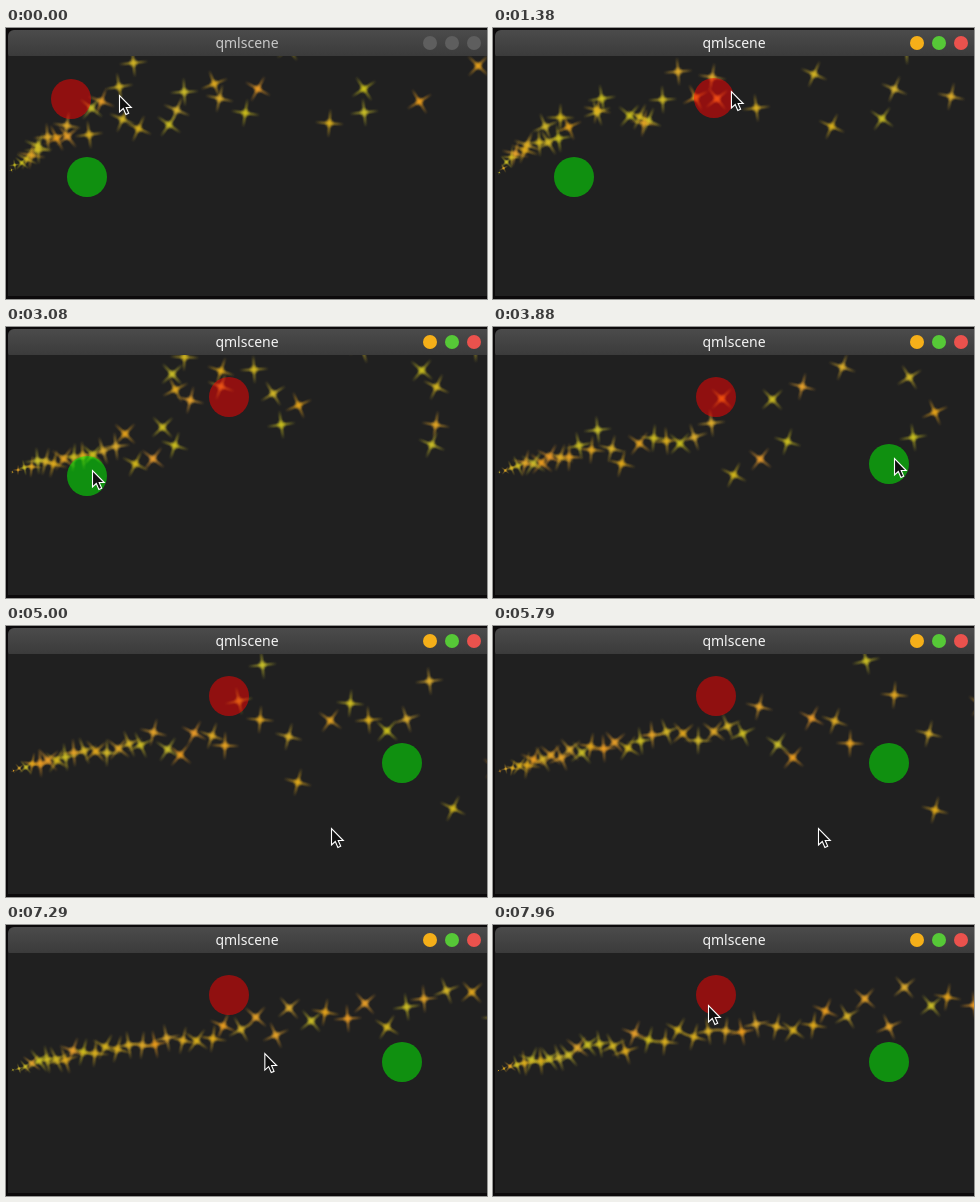
Animation, 481 px wide and 271 px high, one loop 8000 ms. Source, as an HTML page with a canvas:

```html
<!DOCTYPE html>
<html>
<head>
<meta charset="utf-8">
<title>qmlscene</title>
<style>
html, body { margin: 0; width: 100%; height: 100%; overflow: hidden; background: #0c0a0b; }
canvas { display: block; width: 100vw; height: 100vh; }
</style>
</head>
<body>
<canvas id="stage" width="481" height="271"></canvas>
<script>
const ctx = document.getElementById('stage').getContext('2d');
const LOOP = 8000, LIFE = 5000, EMIT_EVERY = 100, FOCUS_AT = 1000;
const SPEED = 55, PULL = 50;

const point = (x, y) => ({ x, y });
const add = (a, b) => point(a.x + b.x, a.y + b.y);
const mix = (a, b, u) => point(a.x + (b.x - a.x) * u, a.y + (b.y - a.y) * u);

// Eased progress from 0 to 1 between two times.
function ease(t, start, end) {
  const u = Math.min(1, Math.max(0, (t - start) / (end - start)));
  return u * u * (3 - 2 * u);
}

const emitter = point(2, 146.5);
const redDrag = t => ease(t, 1120, 1400);
const greenDrag = t => ease(t, 3430, 3830);
const redAt = t => mix(point(65, 71), point(223, 70), redDrag(t));
const greenAt = t => mix(point(81, 149), point(396, 137), greenDrag(t));

// The pointer visits and drags each disc, then rests and wanders off.
function cursorAt(t) {
  const onRed = add(redAt(t), point(17, -7));
  const onGreen = add(greenAt(t), point(5, -6));
  let p = mix(point(113, 67), onRed, ease(t, 40, 800));
  p = mix(p, onGreen, ease(t, 1750, 2700));
  p = mix(p, point(325, 202), ease(t, 3890, 4150));
  return mix(p, point(215, 80), ease(t, 6400, 7960));
}

function randomFrom(seed) {
  return () => {
    seed = (seed + 0x6D2B79F5) | 0;
    let r = Math.imul(seed ^ (seed >>> 15), 1 | seed);
    r = (r + Math.imul(r ^ (r >>> 7), 61 | r)) ^ r;
    return ((r ^ (r >>> 14)) >>> 0) / 4294967296;
  };
}

const random = randomFrom(11);
const spread = range => (random() * 2 - 1) * range;

// A vector of given length from the emitter toward a loosely hit target.
function toward(target, variation, length) {
  const dx = target.x + spread(variation) - emitter.x;
  const dy = target.y + spread(variation) - emitter.y;
  const k = length / Math.hypot(dx, dy);
  return point(dx * k, dy * k);
}

// Stars launch toward the red disc and accelerate toward the green one.
function makeStar(born) {
  const warmth = random() ** 1.5;
  return {
    born,
    velocity: toward(redAt(born), 18, SPEED),
    acceleration: toward(greenAt(born), 26, PULL),
    angle: random() * Math.PI / 2,
    color: [205 + 35 * warmth, 195 - 38 * warmth, 25 + 20 * random()].map(Math.round).join()
  };
}

const stars = Array.from({ length: (LIFE + LOOP) / EMIT_EVERY },
  (_, i) => makeStar(i * EMIT_EVERY - LIFE));

function glow(color, radius, alpha) {
  const gradient = ctx.createRadialGradient(0, 0, 0, 0, 0, radius);
  for (let u = 0; u <= 1; u += 0.125) {
    const falloff = (1 + Math.cos(Math.PI * u)) / 2;
    gradient.addColorStop(u, `rgba(${color},${alpha * falloff})`);
  }
  return gradient;
}

function drawStar({ born, velocity, acceleration, angle, color }, t) {
  const age = (t - born) / 1000;
  if (age < 0 || age * 1000 > LIFE) return;
  const along = axis =>
    emitter[axis] + velocity[axis] * age + acceleration[axis] * age * age / 2;
  const size = Math.min(1, age * 2);
  ctx.save();
  ctx.translate(along('x'), along('y'));
  ctx.rotate(angle);
  ctx.scale(size, size);
  // Soft bars: wide faint strokes under a narrow one.
  ctx.strokeStyle = glow(color, 17, 0.2);
  ctx.lineCap = 'round';
  for (const width of [4.5, 3, 1.5]) {
    ctx.lineWidth = width;
    ctx.beginPath();
    ctx.moveTo(-13, 0);
    ctx.lineTo(13, 0);
    ctx.moveTo(0, -13);
    ctx.lineTo(0, 13);
    ctx.stroke();
  }
  disc(point(0, 0), 6, glow(color, 6, 0.9));
  ctx.restore();
}

function disc({ x, y }, radius, fill) {
  ctx.fillStyle = fill;
  ctx.beginPath();
  ctx.arc(x, y, radius, 0, 7);
  ctx.fill();
}

function drawWindow(focused) {
  ctx.fillStyle = '#0c0a0b';
  ctx.fillRect(0, 0, 481, 271);
  const bar = ctx.createLinearGradient(0, 2, 0, 28);
  bar.addColorStop(0, '#4b4b4b');
  bar.addColorStop(1, '#3b3b3b');
  ctx.fillStyle = bar;
  ctx.beginPath();
  ctx.roundRect(2, 2, 485, 30, 6);
  ctx.fill();
  ctx.fillStyle = '#202020';
  ctx.fillRect(2, 28, 479, 240);

  ctx.fillStyle = focused ? '#f4f4f4' : '#c8c8c8';
  ctx.font = '14px "Noto Sans", "Open Sans", sans-serif';
  ctx.textAlign = 'center';
  ctx.fillText('qmlscene', 241, 20);
  ['#f5af19', '#56c837', '#ea524d'].forEach((color, i) =>
    disc(point(424 + 22 * i, 15), 7, focused ? color : '#5e5e5e'));
}

const arrow = new Path2D('M0 0V16.5L3.8 13L6.4 19L9.2 17.8L6.7 12H11.8Z');

function drawCursor({ x, y }) {
  ctx.save();
  ctx.translate(x + 0.5, y + 0.5);
  ctx.fillStyle = '#111';
  ctx.strokeStyle = '#fff';
  ctx.lineWidth = 1.1;
  ctx.fill(arrow);
  ctx.stroke(arrow);
  ctx.restore();
}

function frame() {
  const t = performance.now() % LOOP;
  drawWindow(t >= FOCUS_AT);
  ctx.save();
  ctx.beginPath();
  ctx.rect(2, 28, 479, 240);
  ctx.clip();
  stars.forEach(star => drawStar(star, t));
  disc(redAt(t), 20, 'rgba(255,0,0,0.5)');
  disc(greenAt(t), 20, 'rgba(0,255,0,0.5)');
  ctx.restore();
  drawCursor(cursorAt(t));
  requestAnimationFrame(frame);
}
frame();
</script>
</body>
</html>
```
